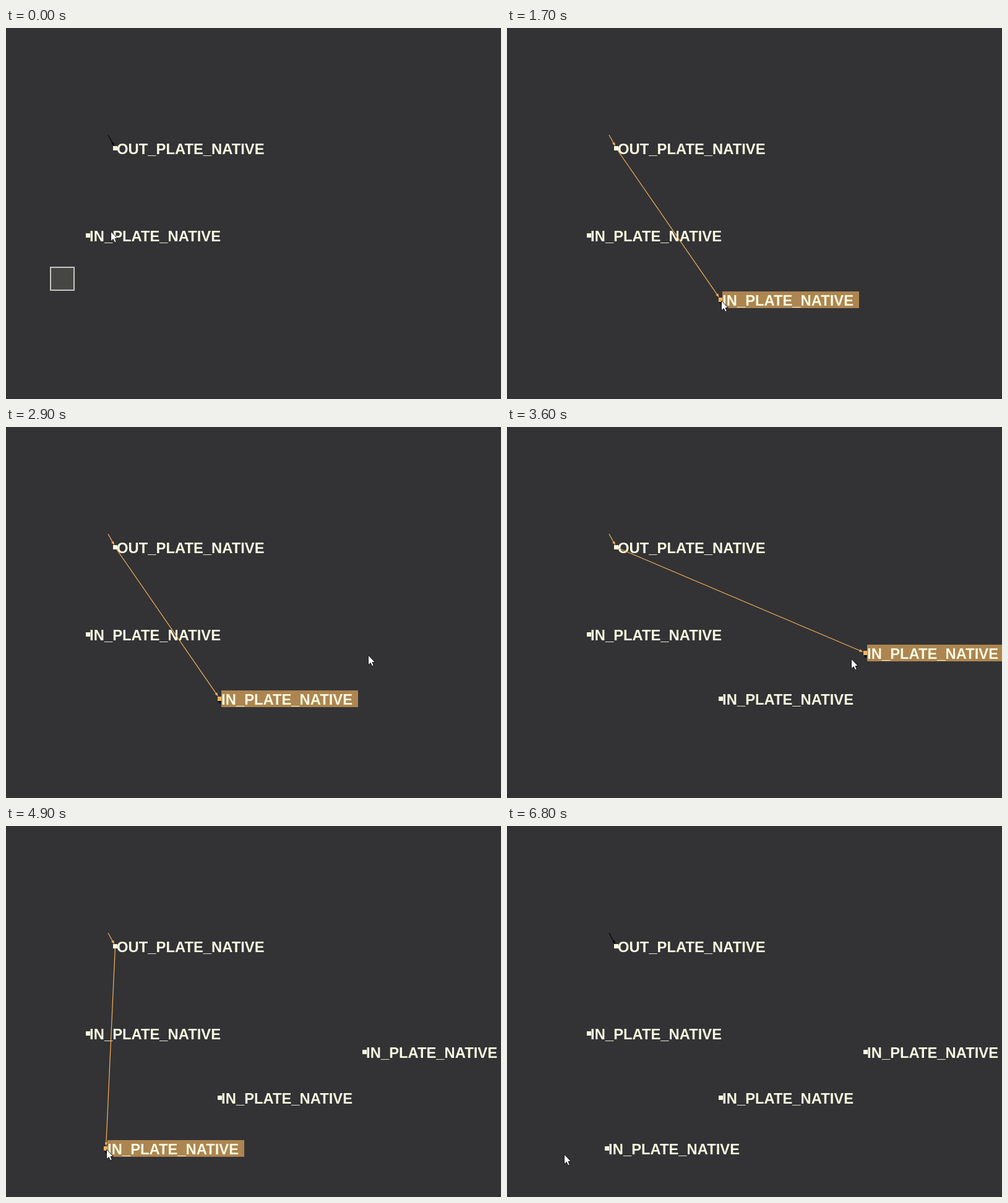
These frames come from a looping animation (800 by 600 pixels, 6900 ms). An HTML page with a canvas:

```html
<!DOCTYPE html>
<html lang="en">
<head>
<meta charset="utf-8">
<title>Node graph</title>
<style>
html, body { margin: 0; width: 100%; height: 100%; overflow: hidden; background: #333335; }
canvas { display: block; }
</style>
</head>
<body>
<canvas id="stage" width="800" height="600"></canvas>
<script>
const ctx = document.getElementById('stage').getContext('2d');
const LOOP = 6900, STEP = 100;
const CREAM = '#f8f9e1', ORANGE = '#f6b25c', BACK = '#333335';

const output = { x: 176.5, y: 194.5, label: 'OUT_PLATE_NATIVE' };

// each input is selected from `on` to `off`; all but the first are pasted at `on`
const inputs = [
  { x: 132.5, y: 335.5, on: 200, off: 1300 },
  { x: 345.5, y: 439.5, on: 1700, off: 3100 },
  { x: 579.5, y: 365.5, on: 3300, off: 4200 },
  { x: 161.5, y: 521.5, on: 4800, off: 5700 }
].map(n => ({ ...n, label: 'IN_PLATE_NATIVE' }));

// cursor moves; bend > 1 delays the vertical part
const home = { x: 170, y: 329 };
const moves = [
  { from: 0, to: 600, x: 310, y: 414 },
  { from: 800, to: 1100, x: 347, y: 441 },
  { from: 1950, to: 2600, x: 619, y: 388, bend: 5.4 },
  { from: 2600, to: 3000, x: 580, y: 366 },
  { from: 3500, to: 4200, x: 163, y: 523 },
  { from: 5000, to: 5800, x: 93, y: 531 }
];

const mix = (a, b, k) => a + (b - a) * k;
const clamp = k => Math.min(1, Math.max(0, k));
const smooth = k => k * k * (3 - 2 * k);

function cursorAt(t) {
  let { x, y } = home;
  for (const m of moves) {
    const k = smooth(clamp((t - m.from) / (m.to - m.from)));
    x = mix(x, m.x, k);
    y = mix(y, m.y, k ** (m.bend || 1));
  }
  return [Math.round(x), Math.round(y)];
}

function polygon(points, fill) {
  ctx.beginPath();
  points.forEach(([x, y]) => ctx.lineTo(x, y));
  ctx.closePath();
  ctx.fillStyle = fill;
  ctx.fill();
}

function rect(x, y, w, h, fill) {
  ctx.fillStyle = fill;
  ctx.fillRect(x, y, w, h);
}

function square(n, fill) {
  rect(n.x - 3.5, n.y - 3.5, 7, 7, fill);
}

function label(n) {
  ctx.fillStyle = CREAM;
  ctx.fillText(n.label, n.x + 2.6, n.y + 9.5);
}

function arrow(x0, y0, x1, y1, color) {
  const len = Math.hypot(x1 - x0, y1 - y0);
  const ux = (x1 - x0) / len, uy = (y1 - y0) / len;
  const bx = x1 - ux * 6, by = y1 - uy * 6;
  ctx.beginPath();
  ctx.moveTo(x0, y0);
  ctx.lineTo(bx, by);
  ctx.strokeStyle = color;
  ctx.lineWidth = 1.2;
  ctx.stroke();
  polygon([[x1, y1], [bx - uy * 2.3, by + ux * 2.3], [bx + uy * 2.3, by - ux * 2.3]], color);
}

// link from the output node to the edge of the selected one
function link(n) {
  const dx = n.x - output.x, dy = n.y - output.y;
  const cut = 1 - 4 / Math.max(Math.abs(dx), Math.abs(dy));
  arrow(output.x, output.y, output.x + dx * cut, output.y + dy * cut, ORANGE);
}

function drawSelected(n) {
  square(n, ORANGE);
  polygon([[n.x - 3, n.y + 3.5], [n.x + 3, n.y + 3.5], [n.x, n.y + 8]], '#000');
  rect(n.x + 2.5, n.y - 13.5, 221, 27, '#ac8550');
  label(n);
}

function marquee(x0, y0, x1, y1) {
  rect(x0, y0, x1 - x0, y1 - y0, '#464644');
  ctx.strokeStyle = '#c6c6c4';
  ctx.lineWidth = 2;
  ctx.strokeRect(x0 + 1, y0 + 1, x1 - x0 - 2, y1 - y0 - 2);
}

function drawCursor(x, y) {
  const shape = [[0, 0], [0, 16], [3.7, 12.5], [6.3, 18], [8.8, 17], [6.5, 11.5], [11, 11.5]];
  polygon(shape.map(([a, b]) => [x - 0.5 + a, y + b]), '#fff');
  ctx.strokeStyle = '#151517';
  ctx.lineWidth = 1;
  ctx.stroke();
}

function draw(t) {
  rect(0, 0, 800, 600, BACK);
  if (t >= 200) rect(0, 0, 1, 1, '#000');
  const visible = inputs.filter((n, i) => i === 0 || t >= n.on);
  const picked = inputs.find(n => t >= n.on && t < n.off);

  label(output);
  for (const n of visible) {
    if (n === picked) continue;
    square(n, CREAM);
    label(n);
  }
  if (picked) {
    drawSelected(picked);
    link(picked);
  }
  square(output, CREAM);
  arrow(165, 173, 175, 191, picked ? ORANGE : '#000');

  if (t < inputs[0].on) marquee(71, 386 - t * 0.56, 111 + t * 0.61, 425);
  drawCursor(...cursorAt(t));
}

function frame() {
  ctx.font = 'bold 23.8px "Liberation Sans", Arial, sans-serif';
  draw(Math.floor(performance.now() % LOOP / STEP) * STEP);
  requestAnimationFrame(frame);
}
frame();
</script>
</body>
</html>
```
